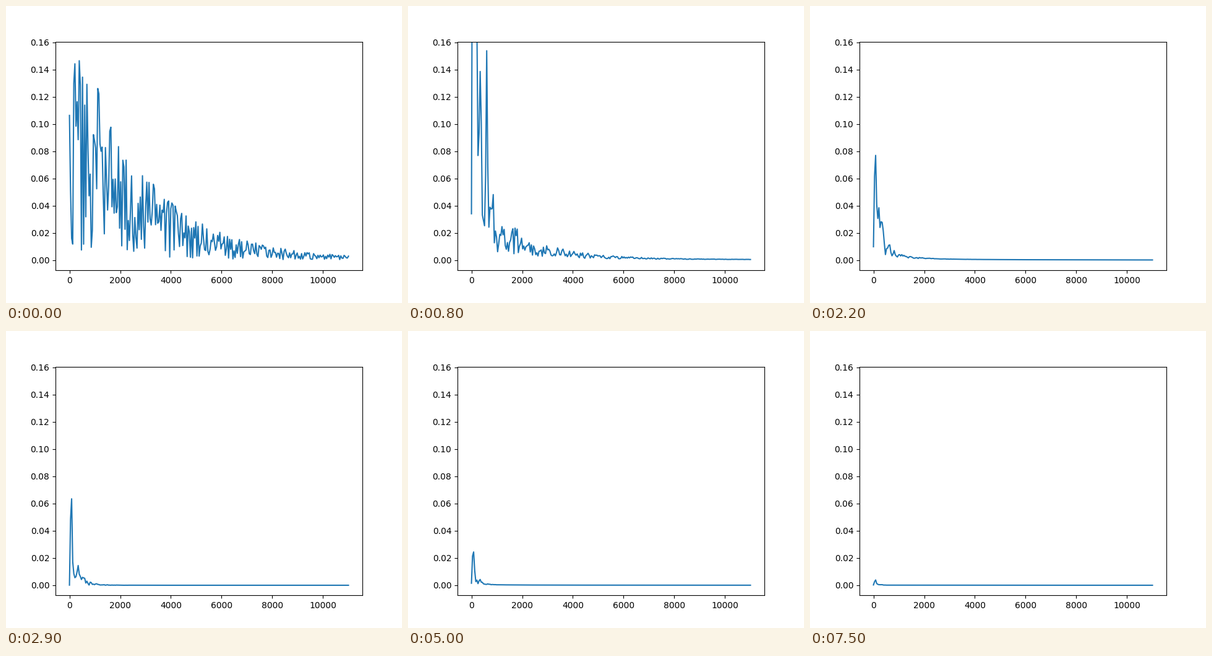
A matplotlib script that plays this animation: 640 by 480 pixels, repeating every 7.6 s.

```python
import matplotlib.pyplot as plt
import numpy as np
from matplotlib.animation import FuncAnimation

FRAMES, INTERVAL = 76, 100
freq = np.linspace(0, 11002, 257)

# Drum modes: pitch in Hz, relative level, lifetime in seconds.
MODES = [(70, 1.0, 100), (190, 1.2, 1.2), (345, 0.6, 3.0), (600, 0.9, 0.9)]


def bump(centre, width=45):
    return np.exp(-((freq - centre) / width) ** 2)


def hiss(t):
    """Broadband noise of the strike, fading and narrowing."""
    width = 2700 * np.exp(-t / 2)
    return np.exp(-t / 0.6) * np.minimum(0.085, 0.105 * np.exp(-freq / width))


def loudness(t):
    """A short boom on top of a long decay; silent before the strike."""
    if t == 0:
        return 0
    return 0.16 * np.exp(-(t / 1.75) ** 6) + 0.1 * np.exp(-(t / 4.15) ** 2)


def leakage(t):
    """Smooth 1/f tail that swells and sinks while it decays."""
    swing = abs(np.cos(np.pi * (t - 0.8) / 1.4))
    return 10 * np.exp(-t / 1.6) * swing / (freq + 300)


def spectrum(i):
    t = i * INTERVAL / 1000
    noise = np.random.default_rng(i).uniform(0.05, 1.8, freq.size)
    modes = sum(level * np.exp(-t / life) * bump(hz) for hz, level, life in MODES)
    skirt = 0.25 * np.exp(-freq / (500 * np.exp(-t / 6)))
    body = loudness(t) * (modes + skirt * noise) * (1 - np.exp(-freq / 20))
    return body + hiss(t) * noise + leakage(t)


fig, ax = plt.subplots(figsize=(6.4, 4.8), dpi=100)
line, = ax.plot(freq, spectrum(0))
ax.set_ylim(-0.0074, 0.1606)


def update(i):
    line.set_ydata(spectrum(i))
    return line,


anim = FuncAnimation(fig, update, frames=FRAMES, interval=INTERVAL, repeat=True)
plt.show()
```
